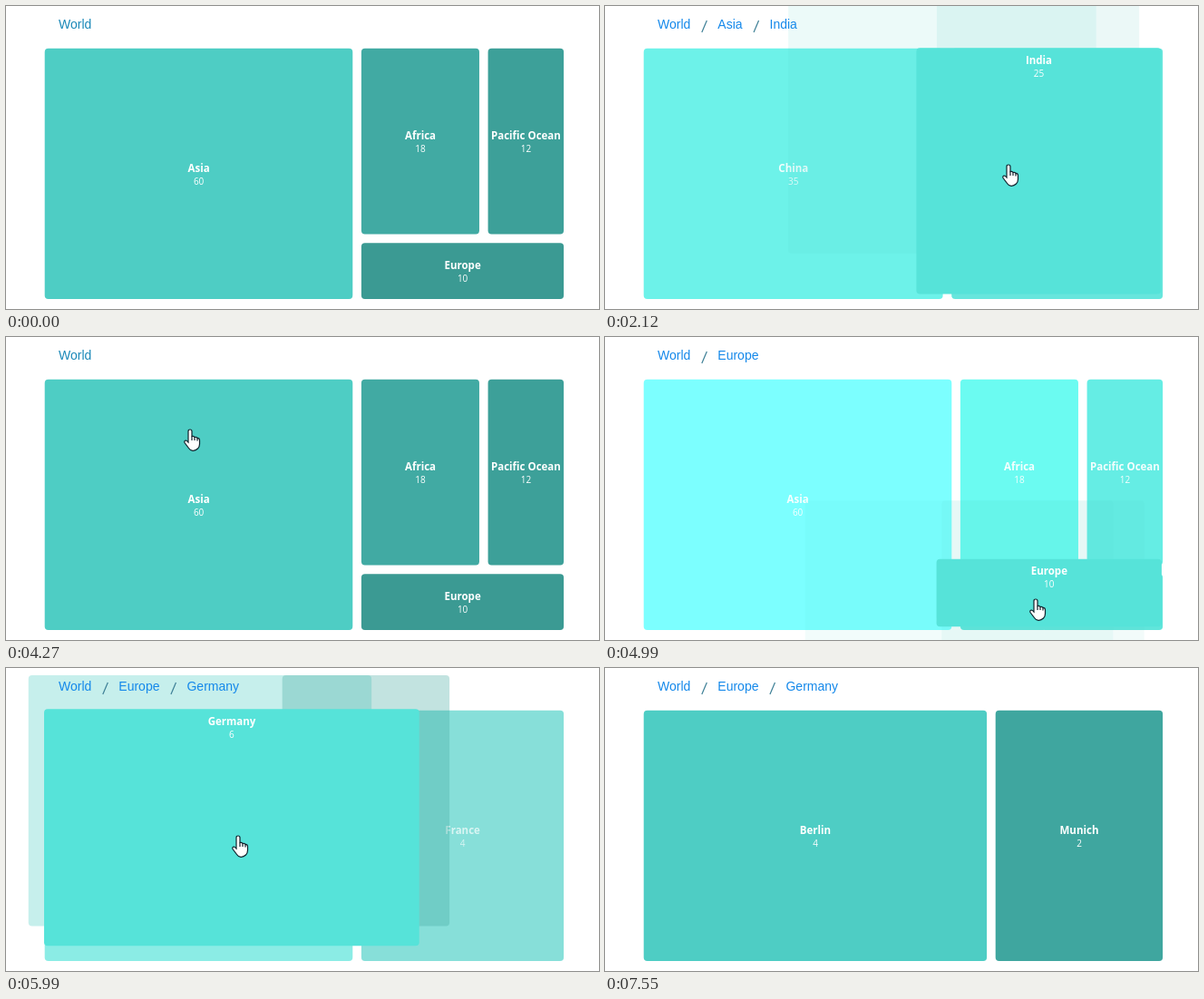
An HTML page with a canvas that plays this animation: 654 by 334 pixels, repeating every 7.98 s.

```html
<!DOCTYPE html>
<html lang="en">
<head>
<meta charset="utf-8">
<title>Treemap drill-down</title>
<style>
  html, body { margin: 0; width: 100%; height: 100%; overflow: hidden; background: #fff; }
  canvas { display: block; }
</style>
</head>
<body>
<canvas id="stage" width="654" height="334"></canvas>
<script>
const ctx = document.getElementById('stage').getContext('2d');
const LOOP = 7980, ZOOM_TIME = 440, PAD = 5, HOME = 'World';
const AREA = { x: 38, y: 42, w: 582, h: 286 };
const ZOOM_END = { x: 41, y: 43, w: 558, h: 230 };
const TEAL = [78, 205, 196];
const lerp = (a, b, p) => a + (b - a) * p;
const clamp = v => Math.max(0, Math.min(1, v));
const smooth = p => p * p * (3 - 2 * p);

const leaf = (name, value, tone = 1) => ({ name, value, color: TEAL.map(v => v * tone) });
const total = node => Array.isArray(node) ? node.reduce((sum, n) => sum + total(n), 0) : node.value;

// Each level of nesting shares its area by value, in alternating directions.
function layout(node, area, across = true) {
  if (!Array.isArray(node)) {
    return [{ ...node, x: area.x + PAD, y: area.y + PAD, w: area.w - 2 * PAD, h: area.h - 2 * PAD }];
  }
  const [pos, size] = across ? ['x', 'w'] : ['y', 'h'];
  let start = area[pos];
  return node.flatMap(part => {
    const extent = area[size] * total(part) / total(node);
    const cells = layout(part, { ...area, [pos]: start, [size]: extent }, !across);
    start += extent;
    return cells;
  });
}

const views = {
  World: [leaf('Asia', 60), [
    [leaf('Africa', 18, 0.83), leaf('Pacific Ocean', 12, 0.78)],
    leaf('Europe', 10, 0.75)
  ]],
  Asia: [leaf('China', 35), leaf('India', 25, 0.94)],
  India: [leaf('Delhi', 15), leaf('Mumbai', 10, 0.92)],
  Europe: [leaf('Germany', 6), leaf('France', 4, 0.92)],
  Germany: [leaf('Berlin', 4), leaf('Munich', 2, 0.81)]
};
for (const name in views) views[name] = layout(views[name], AREA);

// The pointer's stops; a stop with "open" is a click on that name.
const stops = [
  { at: 290, x: 347, y: 262 },
  { at: 580, x: 190, y: 204, rest: 200 },
  { at: 845, x: 203, y: 198, rest: ZOOM_TIME, open: 'Asia' },
  { at: 2071, x: 438, y: 174, rest: ZOOM_TIME, open: 'India' },
  { at: 3400, x: 128, y: 72 },
  { at: 3850, x: 66, y: 12, open: HOME },
  { at: 4958, x: 468, y: 288, rest: ZOOM_TIME, open: 'Europe' },
  { at: 5842, x: 249, y: 184, rest: ZOOM_TIME, open: 'Germany' },
  { at: 6400, x: 236, y: 177, rest: 650 },
  { at: 7545, x: 560, y: 340 }
];

const steps = [{ at: 0, path: [HOME] }];
for (const { at, open } of stops.filter(stop => stop.open)) {
  const path = open === HOME ? [HOME] : [...steps.at(-1).path, open];
  steps.push({ at, path });
}

function box({ x, y, w, h }, color, gain = 1) {
  ctx.fillStyle = `rgb(${color.map(v => Math.min(255, Math.round(v * gain)))})`;
  ctx.beginPath();
  ctx.roundRect(x - 0.3, y - 0.3, w + 0.4, h + 0.4, 4);
  ctx.fill();
}

function label(item, x, nameY) {
  ctx.fillStyle = '#fff';
  ctx.textAlign = 'center';
  ctx.font = '700 11.5px "Open Sans", "Noto Sans", sans-serif';
  ctx.fillText(item.name, x, nameY);
  ctx.font = '500 10px "Open Sans", "Noto Sans", sans-serif';
  ctx.fillText(item.value, x, nameY + 14);
}

function drawCell(item, gain) {
  box(item, item.color, gain);
  label(item, item.x + item.w / 2, item.y + item.h / 2 - 2);
}

function drawZoom(parents, children, name, p) {
  const source = parents.find(item => item.name === name);
  const gain = 227 / source.color[1];
  const fade = 0.94 * p;
  ctx.globalAlpha = 1 - fade;
  parents.forEach(item => drawCell(item, gain));

  // Children keep their final size while their positions spread out.
  ctx.globalAlpha = fade;
  const sx = source.w / ZOOM_END.w, sy = source.h / ZOOM_END.h;
  let offset = 0;
  for (const child of children) {
    const x = lerp(source.x * (1 - sx) + offset * sx, ZOOM_END.x + offset, p);
    const y = lerp(source.y * (1 - sy), ZOOM_END.y, p);
    drawCell({ ...child, x, y });
    offset += child.w;
  }

  ctx.globalAlpha = Math.min(1, 1.6 - 1.2 * p);
  const rect = {};
  for (const key in ZOOM_END) rect[key] = lerp(source[key], ZOOM_END[key], p);
  box(rect, source.color, gain);
  label(source, rect.x + rect.w / 2, rect.y + 17);
  ctx.globalAlpha = 1;
}

function drawPath(path) {
  ctx.font = '14px "Liberation Sans", Arial, sans-serif';
  ctx.textAlign = 'left';
  let x = 58;
  path.forEach((name, i) => {
    if (i) {
      ctx.strokeStyle = '#3d7f96';
      ctx.lineWidth = 1.2;
      ctx.beginPath();
      ctx.moveTo(x - 17.5, 29);
      ctx.lineTo(x - 12, 16);
      ctx.stroke();
    }
    ctx.fillStyle = path.length > 1 ? '#1488ea' : '#1a88b8';
    ctx.fillText(name, x, 25);
    x += ctx.measureText(name).width + 30;
  });
}

const hand = new Path2D('M7 1Q9 1 9 3V8.5Q11.5 7.8 12 9.5Q14.5 8.8 15 10.5' +
  'Q17.5 10.2 17.5 13V17Q17.5 20 15.5 22Q13 24.5 10 24.3Q7 24 5.5 21.5' +
  'L1 15.5Q.2 13.2 2.5 13Q3.5 13.3 5 15V3Q5 1 7 1Z');
const knuckles = new Path2D('M9 8.5V13M12 9.5V13M15 10.5V13.5');

function drawPointer(t) {
  const next = stops.findIndex(stop => stop.at > t);
  if (next < 1) return;
  const from = stops[next - 1], to = stops[next];
  const leave = from.at + (from.rest || 0);
  const p = smooth(clamp((t - leave) / (to.at - leave)));
  ctx.save();
  ctx.translate(Math.round(lerp(from.x, to.x, p)), Math.round(lerp(from.y, to.y, p)));
  ctx.fillStyle = '#fff';
  ctx.strokeStyle = '#10222c';
  ctx.lineWidth = 1.2;
  ctx.fill(hand);
  ctx.stroke(hand);
  ctx.stroke(knuckles);
  ctx.restore();
}

function draw(t) {
  ctx.fillStyle = '#fff';
  ctx.fillRect(0, 0, 654, 334);
  const index = steps.findLastIndex(step => step.at <= t);
  const { at, path } = steps[index];
  const name = path.at(-1), p = (t - at) / ZOOM_TIME;
  if (name !== HOME && p < 1) {
    drawZoom(views[steps[index - 1].path.at(-1)], views[name], name, p);
  } else {
    views[name].forEach(item => drawCell(item));
  }
  drawPath(path);
  drawPointer(t);
}

const began = performance.now();
function tick() {
  draw((performance.now() - began) % LOOP);
  requestAnimationFrame(tick);
}
tick();
</script>
</body>
</html>
```
